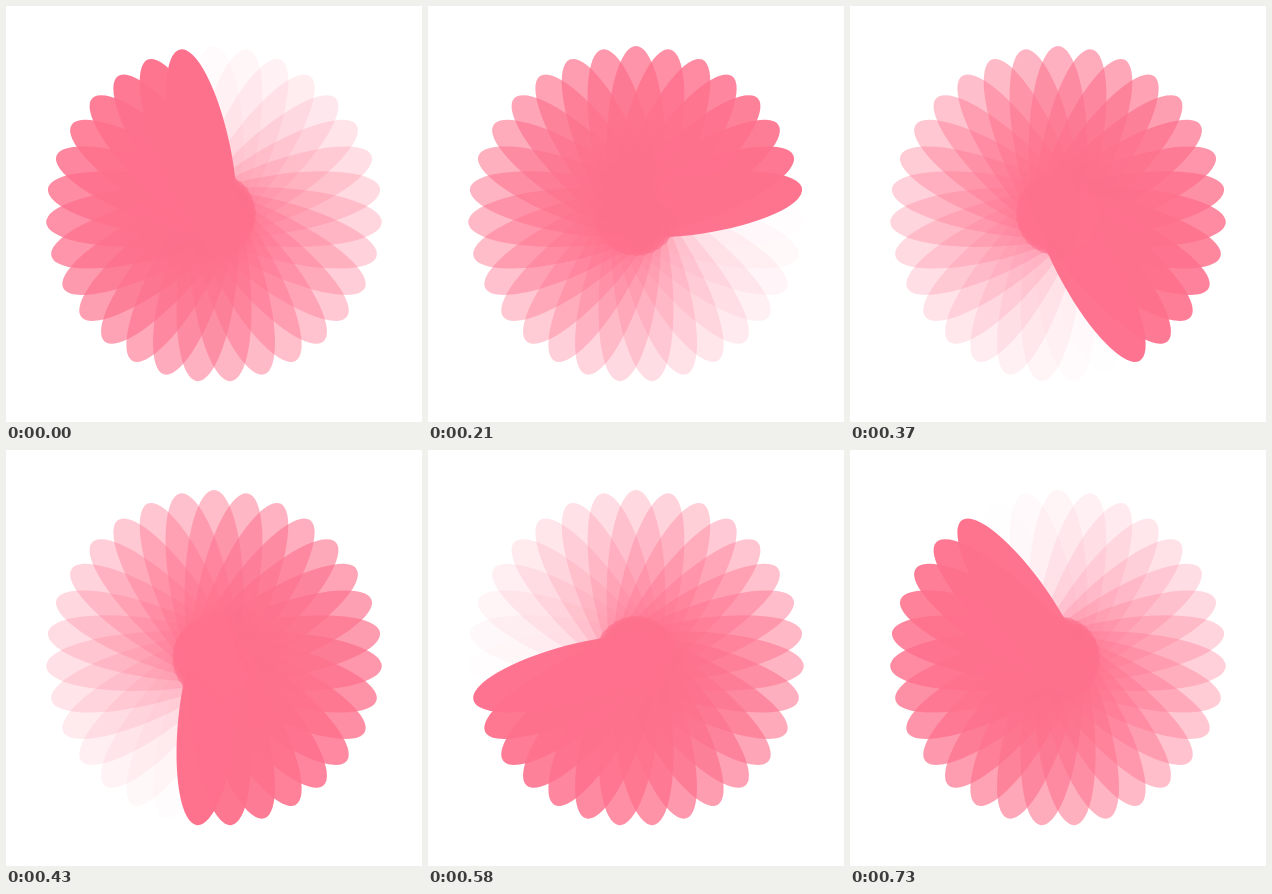
Animation of 416 by 416 pixels, one loop 760 ms. Source, as an HTML page with a canvas:

```html
<!DOCTYPE html>
<html lang="en">
<head>
<meta charset="utf-8">
<title>Petal spinner</title>
<style>
  html, body { margin: 0; width: 100%; height: 100%; overflow: hidden; background: #fff; }
  canvas { display: block; }
</style>
</head>
<body>
<canvas id="stage" width="416" height="416"></canvas>
<script>
const ctx = document.getElementById('stage').getContext('2d');
const SIZE = 416;
const PETALS = 31;
const STEPS = 25;
const STEP_MS = 30;
const LOOP_MS = 760;
const PETAL = { offset: 63, length: 105, width: 29.4, color: '#fe718d' };

// Every step lasts 30 ms, except the one starting at 270 ms, which lasts 40.
function stepAt(ms) {
  const t = ms % LOOP_MS;
  return t < 310 ? Math.min(9, Math.floor(t / STEP_MS)) : Math.floor((t - 10) / STEP_MS);
}

function drawPetal(index, alpha) {
  ctx.save();
  ctx.translate(SIZE / 2, SIZE / 2);
  ctx.rotate(index / PETALS * Math.PI * 2);
  ctx.globalAlpha = alpha;
  ctx.beginPath();
  ctx.ellipse(0, -PETAL.offset, PETAL.width, PETAL.length, 0, 0, Math.PI * 2);
  ctx.fill();
  ctx.restore();
}

function render(ms) {
  const head = stepAt(ms) / STEPS * PETALS;
  ctx.fillStyle = '#fff';
  ctx.fillRect(0, 0, SIZE, SIZE);
  ctx.fillStyle = PETAL.color;
  for (let i = 0; i < PETALS; i++) {
    const age = (head - i - 1 + PETALS) % PETALS;
    drawPetal(i, 1 - age / PETALS);
  }
}

let start;
function tick(now) {
  start ??= now;
  render(now - start);
  requestAnimationFrame(tick);
}
render(0);
requestAnimationFrame(tick);
</script>
</body>
</html>
```
